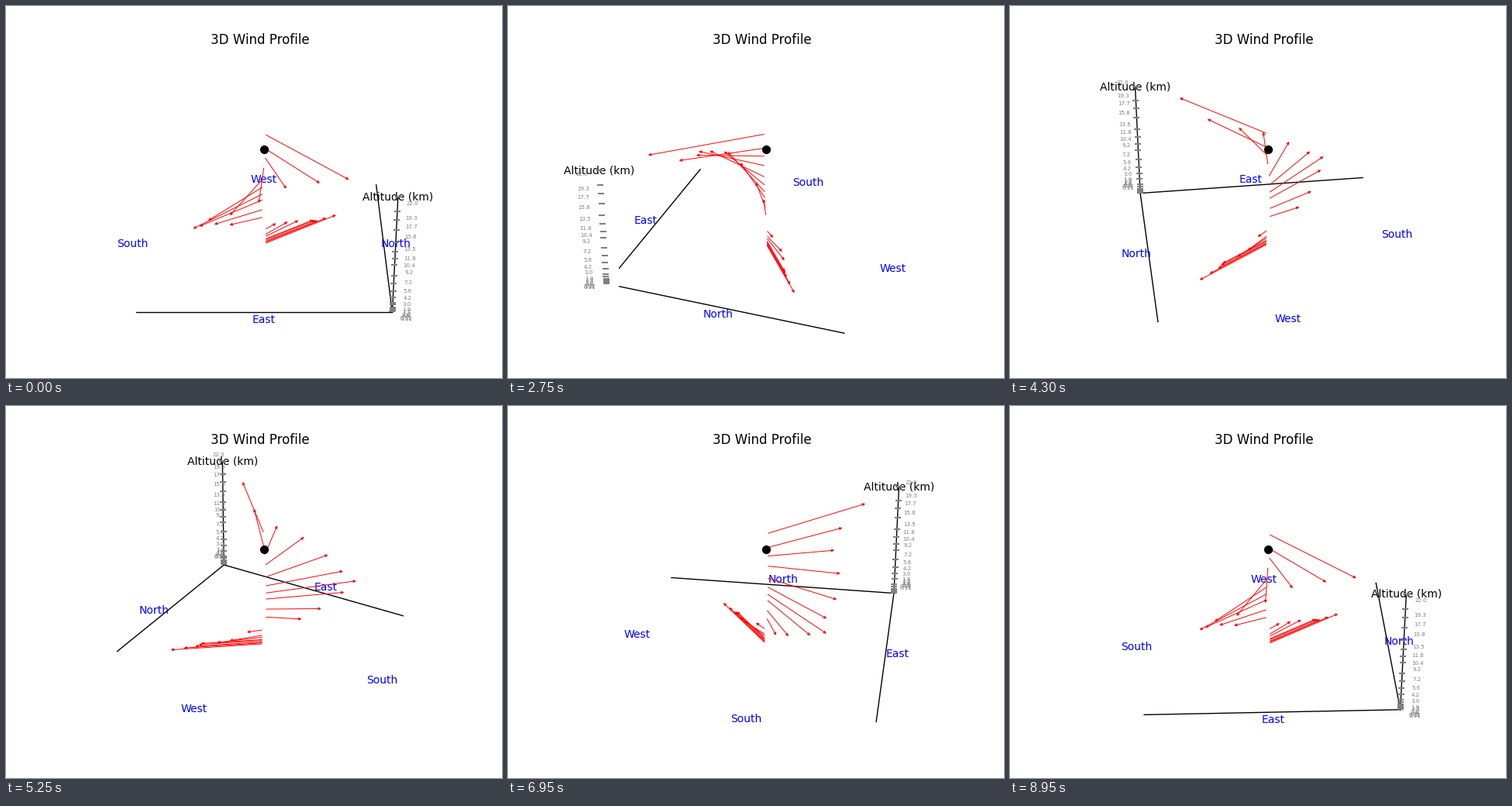
A matplotlib script that plays this animation: 640x480 px, repeating every 9 s.

```python
import numpy as np
import matplotlib.pyplot as plt
from matplotlib.animation import FuncAnimation
from matplotlib.patches import FancyArrowPatch, Rectangle

W, H, DPI = 640, 480, 100
FRAMES, INTERVAL = 180, 50

# Camera: centre of the view in pixels, pixels per unit, distance, elevation
CX, CY = 333, 237.7
SCALE, DIST = 1997.84, 10
ELEV = np.radians(30)

# Half sizes of the drawn box and the highest level in km
R, HZ, TOP = 0.7884, 0.41143, 22.0
LABEL = 1.1 * R

# Pressure level heights in km, also shown as the scale
ALTS = [0.11, 0.32, 0.5, 0.8, 1.0, 1.5, 1.9, 3.0, 4.2, 5.6, 7.2, 9.2, 10.4,
        11.8, 13.5, 15.8, 17.7, 19.3, TOP]

# Wind keys by height: the flow reverses at the calm level, then veers
SPEED = {0.11: -0.63, 0.5: -0.47, 1: -0.43, 1.9: -0.25, 4.2: 0, 5.6: 0.26,
         10.4: 0.64, 11.8: 0.57, 17.7: 0.46, 22: 0.793}
ANGLE = {1: -53, 1.9: -43, 3: -45, 5.6: -66, 11.8: -39, 15.8: -4,
         19.3: 37, 22: 41}


def at_height(keys, km):
    return np.interp(km, list(keys), list(keys.values()))


def wind(km):
    """Eastward and northward wind at a height."""
    speed = at_height(SPEED, km)
    angle = np.radians(at_height(ANGLE, km))
    return speed * np.cos(angle), speed * np.sin(angle)


def project(x, y, km, azim):
    """Perspective view of a point, in pixels from the top left."""
    z = HZ * (2 * np.asarray(km) / TOP - 1)
    c, s = np.cos(azim), np.sin(azim)
    right = y * c - x * s
    radial = x * c + y * s
    up = z * np.cos(ELEV) - radial * np.sin(ELEV)
    depth = DIST - radial * np.cos(ELEV) - z * np.sin(ELEV)
    return CX + SCALE * right / depth, CY - SCALE * up / depth


fig = plt.figure(figsize=(W / DPI, H / DPI), dpi=DPI, facecolor="white")
ax = fig.add_axes([0, 0, 1, 1])
ax.set_xlim(0, W)
ax.set_ylim(H, 0)
ax.axis("off")

pane = Rectangle((143.2, 57.6), 369.6, 369.6, transform=ax.transData)

ax.text(328, 49.27, "3D Wind Profile", size=12, ha="center", va="baseline")

# Box edges leaving the north-east corner
CORNER = (R, R, 0)
ENDS = [(R, -R, 0), (-R, R, 0), (R, R, TOP)]
edges = []
for _ in ENDS:
    line, = ax.plot([], [], color="black", lw=1, zorder=2)
    line.set_clip_path(pane)
    edges.append(line)

ticks, = ax.plot([], [], ls="none", marker="_", ms=6, mew=1.5, color="gray",
                 clip_on=False, zorder=4.5)

# Texts pinned to points in space
labels = []


def add_label(text, pos, size=10, color="blue"):
    item = ax.text(0, 0, text, ha="center", va="center", zorder=3,
                   size=size, color=color)
    labels.append((item, pos))


add_label("North", (0, LABEL, 0))
add_label("South", (0, -LABEL, 0))
add_label("East", (LABEL, 0, 0))
add_label("West", (-LABEL, 0, 0))
add_label("Altitude (km)", (R, R, TOP), color="black")
for km in ALTS:
    add_label(str(km), (LABEL, LABEL, km), size=5, color="gray")

arrows = []
for km in ALTS:
    u, v = wind(km)
    if np.hypot(u, v) > 0.01:
        arrow = FancyArrowPatch((0, 0), (1, 1), arrowstyle="-|>",
                                mutation_scale=5, lw=0.7, color="red",
                                shrinkA=2, shrinkB=2, zorder=4)
        ax.add_patch(arrow)
        arrows.append((arrow, km, u, v))

ax.plot(*[[p] for p in project(0, 0, 19.05, 0)], "o", color="black",
        ms=7.07, mew=1, zorder=5)


def update(i):
    azim = 2 * np.pi * i / FRAMES
    corner = project(*CORNER, azim)
    for line, end in zip(edges, ENDS):
        line.set_data(*zip(project(*end, azim), corner))
    ticks.set_data(*project(R, R, ALTS, azim))
    for item, pos in labels:
        item.set_position(project(*pos, azim))
    for arrow, km, u, v in arrows:
        arrow.set_positions(project(0, 0, km, azim), project(u, v, km, azim))
    return []


anim = FuncAnimation(fig, update, frames=FRAMES, interval=INTERVAL,
                     init_func=lambda: update(0), repeat=True,
                     repeat_delay=0, blit=False)
plt.show()
```
